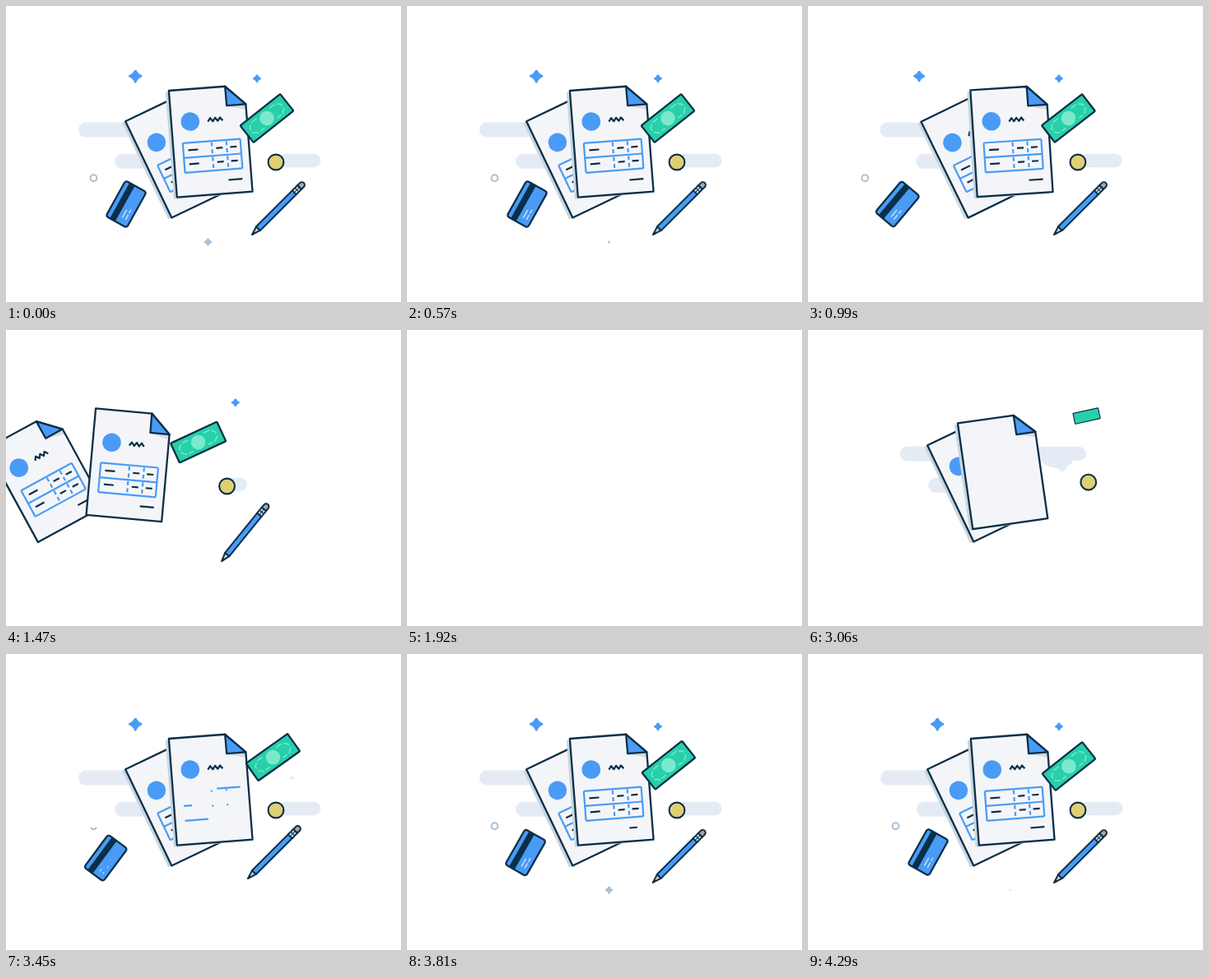
Animation, 480 px wide and 360 px high, one loop 4.32 s. Source, as an HTML page with a canvas:

```html
<!DOCTYPE html>
<html lang="en">
<head>
<meta charset="utf-8">
<title>Invoices</title>
<style>
  html, body { margin: 0; width: 100%; height: 100%; overflow: hidden; background: #fff; }
  canvas { display: block; width: 480px; height: 360px; }
</style>
</head>
<body>
<canvas id="stage" width="480" height="360"></canvas>
<script>
const ctx = document.getElementById('stage').getContext('2d');
const LOOP = 4320;
const INK = '#0b2f49', BLUE = '#4a9bf5', PAPER = '#f4f5f8', CLOUD = '#e5ebf5';
const SHADE = '#c8d6e0', MIST = '#abc1d8', TEAL = '#27d0aa', MINT = '#7be9cc', GOLD = '#dfd073';

const clamp = x => Math.max(0, Math.min(1, x));
const seg = (t, a, b) => clamp((t - a) / (b - a));
const mix = (a, b, p) => a + (b - a) * p;
const out = p => 1 - (1 - p) * (1 - p);
const smooth = p => p * p * (3 - 2 * p);
const back = p => 1 + 2.2 * Math.pow(p - 1, 3) + 1.2 * Math.pow(p - 1, 2);

// Distance travelled to the left by something that leaves at `start`.
function leave(t, start) {
  if (t > 2000 || t < start) return 0;
  const rush = Math.max(0, t - 1620) / 300;
  return 4.06e-7 * Math.pow(t - start, 3) + 90 * rush * rush;
}

function place(x, y, deg, scale, draw) {
  if (scale <= 0.01) return;
  ctx.save();
  ctx.translate(x, y);
  ctx.rotate(deg * Math.PI / 180);
  ctx.scale(scale, scale);
  draw();
  ctx.restore();
}

function poly(points, fill, stroke, width = 2.3) {
  ctx.beginPath();
  points.forEach(p => ctx.lineTo(p[0], p[1]));
  ctx.closePath();
  paint(fill, stroke, width);
}

function paint(fill, stroke, width) {
  if (fill) { ctx.fillStyle = fill; ctx.fill(); }
  if (stroke) { ctx.strokeStyle = stroke; ctx.lineWidth = width; ctx.stroke(); }
}

function disc(x, y, r, fill, stroke, width = 2.3) {
  ctx.beginPath();
  ctx.arc(x, y, Math.max(0, r), 0, 7);
  paint(fill, stroke, width);
}

function box(x, y, w, h, r, fill, stroke, width = 2.3) {
  ctx.beginPath();
  ctx.roundRect(x, y, w, h, r);
  paint(fill, stroke, width);
}

// Line from a to b, drawn up to fraction p.
function line(x1, y1, x2, y2, p, color, width) {
  if (p <= 0) return;
  p = Math.min(p, 1);
  ctx.beginPath();
  ctx.moveTo(x1, y1);
  ctx.lineTo(mix(x1, x2, p), mix(y1, y2, p));
  paint(null, color, width);
}

function bar(x1, x2, y, half) {
  const w = x2 - x1, h = Math.min(half, w / 2.6);
  if (w > 1) box(x1, y - h, w, h * 2, h, CLOUD);
}

function star(x, y, r, color) {
  if (r < 0.3) return;
  const c = r * 0.28;
  ctx.beginPath();
  ctx.moveTo(x, y - r);
  ctx.quadraticCurveTo(x + c, y - c, x + r, y);
  ctx.quadraticCurveTo(x + c, y + c, x, y + r);
  ctx.quadraticCurveTo(x - c, y + c, x - r, y);
  ctx.quadraticCurveTo(x - c, y - c, x, y - r);
  paint(color, color, r * 0.4);
}

const SHEET = [[-46, -65], [22.5, -65], [46, -41.5], [46, 65], [-46, 65]];

function table(p) {
  const l = -34, r = 36, w = 2.2;
  line(r, 0, l, 0, p * 2.4, BLUE, w);
  line(l, 36, r, 36, p * 2.4, BLUE, w);
  line(l, 18, r, 18, p * 1.6 - 0.13, BLUE, w);
  line(l, 36, l, 0, p * 2 - 0.5, BLUE, w);
  line(r, 0, r, 36, p * 2 - 0.5, BLUE, w);
  ctx.setLineDash([5, 3.5]);
  for (const x of [1, 19])
    for (const y of [1.5, 19.5]) line(x, y, x, y + 16, p * 1.6 - 0.15, BLUE, w);
  ctx.setLineDash([]);
  for (const y of [9, 26]) {
    line(-28, y, -16, y, p * 2.2 - 0.8, INK, 2.2);
    line(6, y, 14, y, p * 2.2 - 1, INK, 2.2);
    line(23, y, 31, y, p * 2.2 - 1.2, INK, 2.2);
  }
}

function squiggle(p) {
  if (p <= 0) return;
  ctx.save();
  ctx.beginPath();
  ctx.rect(-4, -34, 24 * p, 16);
  ctx.clip();
  ctx.beginPath();
  for (let i = 0; i < 7; i++) ctx.lineTo(-1.5 + i * 3, i % 2 ? -28 : -23.8);
  paint(null, INK, 2.2);
  ctx.restore();
}

function sheet(x, y, deg, scale, shade, ink) {
  ctx.globalAlpha = clamp(shade);
  place(x - 4, y + 2, deg, scale, () => poly(SHEET, SHADE));
  ctx.globalAlpha = 1;
  place(x, y, deg, scale, () => {
    poly(SHEET, PAPER);
    poly([[23, -41], [46, -41], [46, -35]], '#d5dbe2');
    poly(SHEET, null, INK);
    poly([[22.5, -65], [46, -41.5], [22.7, -41.5]], BLUE, INK);
    disc(-23, -25.6, 11.3 * ink.seal, BLUE);
    squiggle(ink.title);
    table(ink.table);
    line(18, 48.7, 35, 48.7, ink.sign, INK, 2.2);
  });
}

function clouds(t, on) {
  const d = leave(t, 867);
  const open = on ? 1 : out(seg(t, 2820, 3360));
  if (open > 0) {
    bar(mix(165, 88, open) - d, 165 - d, 150.6, 9);
    bar(mix(178, 132, open) - d, 178 - d, 188.8, 9);
  }
  const grow = on ? 1 : out(seg(t, 3100, 3340));
  bar(330 - leave(t, 944), mix(330, 382.5, grow) - d, 188, 8.3);

  // Passing puff with a drip, shrinking to a drop.
  if (!on && t > 2850 && t < 3540) {
    const q = smooth(seg(t, 3060, 3450)), rise = out(seg(t, 2850, 3040));
    const gone = 1 - seg(t, 3460, 3540);
    bar(mix(250, 345.5, q), mix(mix(250, 338, rise), 350.5, q), 150.5, mix(8.5, 3, q) * gone);
    const s = rise * (1 - q);
    if (s > 0.02) {
      ctx.beginPath();
      ctx.ellipse(mix(348, 303, s), 159, 18 * s, 9 * s, 0, 0, 7);
      paint(CLOUD);
      ctx.beginPath();
      ctx.ellipse(mix(348, 309, s), 163, 6 * s, 9 * s, 0, 0, 7);
      paint(CLOUD);
    }
  }
}

function money(detail) {
  box(-31, -13, 62, 26, 1, TEAL, INK);
  if (detail <= 0) return;
  ctx.globalAlpha = detail;
  disc(0, 0, 8.8 * detail, MINT);
  ctx.setLineDash([8, 2.5]);
  for (const s of [-1, 1]) {
    ctx.beginPath();
    [[10, -7.5], [19, -7.5], [24, -3], [24, 3], [19, 7.5], [10, 7.5]]
      .forEach(p => ctx.lineTo(s * p[0], p[1]));
    paint(null, MINT, 1.4);
  }
  ctx.setLineDash([]);
  ctx.globalAlpha = 1;
}

function card(ink) {
  box(-24.7, -14.5, 49.4, 29, 3, BLUE);
  ctx.fillStyle = INK;
  ctx.fillRect(-24.7, -9, 49.4, 7.5);
  box(-24.7, -14.5, 49.4, 29, 3, null, INK);
  line(-17, 4, -6, 4, ink, '#d5e8fc', 1.3);
  line(-17, 8.5, -10, 8.5, ink, '#d5e8fc', 1.3);
  line(-8, 8.5, -3, 8.5, ink, '#d5e8fc', 1.3);
}

function pencil() {
  poly([[-44.5, 0], [-34, -3.3], [-34, 3.3]], '#cfcfca', INK, 2);
  poly([[-45, 0], [-41, -1.2], [-41, 1.2]], INK, INK, 1);
  box(-34, -3.4, 63, 6.8, 0, BLUE, INK, 2);
  box(28, -3.4, 9, 6.8, 0, '#e8edf2', INK, 2);
  line(32.5, -2.5, 32.5, 2.5, 1, INK, 1.3);
  line(29, 0, 36, 0, 1, INK, 1);
  box(37, -3.4, 7.5, 6.8, [0, 3.4, 3.4, 0], '#a9a7a3', INK, 2);
}

function draw(t) {
  ctx.clearRect(0, 0, 480, 360);
  if (t >= 1920 && t < 2310) return;
  ctx.lineJoin = 'round';
  ctx.lineCap = 'butt';
  const on = t < 1920;
  const step = (a, b) => on ? 1 : seg(t, a, b);
  const away = (a, b) => 1 - out(step(a, b));
  const pop = (a, b) => { const p = step(a, b); return p > 0 ? back(p) : 0; };
  const twist = d => Math.pow(d, 0.6);

  clouds(t, on);

  let d = leave(t, 728), o = away(2310, 2750);
  sheet(214.7 - d, 179 , -25.6 + 14 * o - 0.14 * twist(d), pop(2310, 2700), 1 - d / 60, {
    seal: pop(2800, 3000), title: step(2900, 3100),
    table: step(3030, 3480), sign: step(3350, 3550)
  });

  d = leave(t, 845);
  o = 1 - smooth(step(2850, 3400));
  sheet(248.7 - 18 * o - d, 164.3 + 10.5 * o, -4.4 - 5.5 * o + 0.6 * twist(d), pop(2540, 2840), 1 - d / 30, {
    seal: pop(3060, 3300), title: step(3200, 3400),
    table: step(3380, 3800), sign: step(3700, 3900)
  });

  d = leave(t, 881);
  o = away(2950, 4000);
  place(317 + 27 * o - d, 136.5 - 40 * o, -38.4 + 26 * smooth(1 - step(3040, 3560)) + 0.95 * twist(d),
    step(2950, 3170), () => money(step(3150, 3350)));

  o = away(2800, 3400);
  disc(328 + 40 * o - leave(t, 944), 190 - 15 * o, 9.4 * step(2850, 3000), GOLD,
    step(2850, 3000) > 0 ? INK : null, 2.1);

  d = leave(t, 1008);
  o = away(3150, 3900);
  place(330.5 - 14 * o - d, 246.6 - 14 * o, -45 - 0.65 * twist(d), out(step(3150, 3350)), pencil);

  d = leave(t, 540);
  o = away(3200, 3950);
  place(146 - 56 * o - d, 241 + 16 * o, -61 + 17 * o + 1.26 * twist(d),
    out(step(3180, 3380)), () => card(step(3400, 3600)));

  const ring = step(3350, 3640);
  if (ring > 0) {
    ctx.beginPath();
    ctx.arc(106.5 - d, 209.2, 3.9, Math.PI * (0.5 - ring), Math.PI * (0.5 + ring));
    paint(null, MIST, 2.1);
  }

  d = leave(t, 612);
  star(157.2 - d, 85.3, (6.9 - Math.min(1, d / 22)) * pop(3180, 3400), BLUE);
  star(305 - leave(t, 1070), 88.2, 4.3 * pop(3500, 3720), BLUE);

  const glint = on ? 1 - seg(t, 360, 700)
    : t < 4200 ? Math.sin(Math.PI * seg(t, 3500, 4200)) : 0.15 * seg(t, 4265, 4290) + 0.85 * seg(t, 4290, 4320);
  star(245.5, 287, 4.2 * glint, MIST);
}

const began = performance.now();
function frame() {
  draw((performance.now() - began) % LOOP);
  requestAnimationFrame(frame);
}
frame();
</script>
</body>
</html>
```
